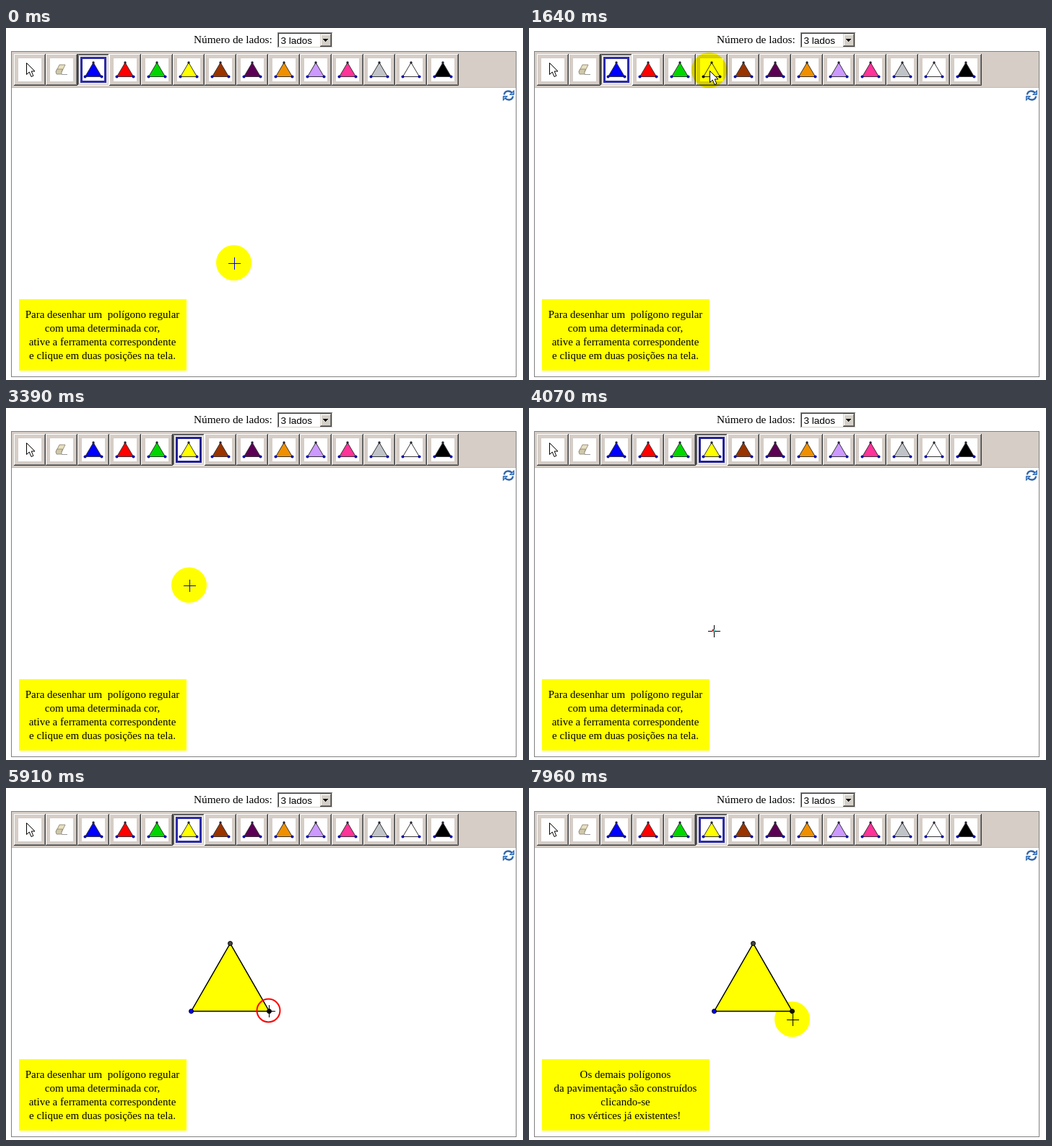
Recreate the animation shown at these times as an HTML page. Size 716x488 px, loop 8 s.

```html
<!DOCTYPE html>
<html lang="pt">
<head>
<meta charset="utf-8">
<style>
  html, body { margin: 0; width: 100%; height: 100%; overflow: hidden; background: #fff; }
  svg { display: block; isolation: isolate; }
  text { font-family: "Liberation Serif", serif; font-size: 15px; }
  #halo { mix-blend-mode: multiply; }
</style>
</head>
<body>
<svg width="716" height="488" viewBox="0 0 716 488">
  <rect width="716" height="488" fill="#fff"/>
  <text x="260" y="21" style="font-size:15.3px">Número de lados:</text>

  <g shape-rendering="crispEdges" fill="none">
    <path d="M376.5 27V6.5H452" stroke="#808080"/>
    <path d="M377.5 26V7.5H451" stroke="#404040"/>
    <path d="M377 26.5H451.5V7" stroke="#d4d0c8"/>
    <rect x="435" y="8" width="16" height="18" fill="#d4d0c8"/>
    <path d="M436.5 24V9.5H449" stroke="#fff"/>
    <path d="M435 25.5H450.5V8" stroke="#404040"/>
    <path d="M436 24.5H449.5V9" stroke="#808080"/>
    <path d="M439 15h7l-3.5 4z" fill="#000"/>
  </g>
  <text x="380.5" y="22" style="font:13.5px 'Liberation Sans',sans-serif">3 lados</text>

  <rect x="8" y="33" width="698" height="50" fill="#d5cdc6"/>
  <path d="M8 82.5H706" stroke="#c3bcb5"/>
  <rect x="7.5" y="32.5" width="699" height="451" fill="none" stroke="#808080"/>
  <g id="buttons"></g>

  <g fill="none" stroke="#2f66ad" stroke-width="2.4">
    <path d="M690 92.5C690.5 87 697 86 700.5 89.5M702 94.5C701.5 100 695 101 691.5 97.5"/>
    <path d="M703.5 86.5v6h-6zM688.5 100.5v-6h6z" fill="#6fa3dc" stroke-width="1"/>
  </g>

  <rect x="18" y="376" width="232" height="99" fill="#ff0"/>
  <g id="note" text-anchor="middle"></g>

  <g id="firstPoint">
    <circle cx="256.5" cy="309.5" r="5" fill="#a9b4d8"/>
    <circle cx="256.5" cy="309.5" r="3.5" fill="#00c" stroke="#003"/>
  </g>
  <g id="triangle" stroke="#000">
    <path d="M256.5 309.5H364.5L310.5 215.5z" fill="#ff0" stroke-width="1.5"/>
    <circle cx="256.5" cy="309.5" r="3" fill="#00f"/>
    <circle cx="364.5" cy="309.5" r="3" fill="#111"/>
    <circle cx="310.5" cy="215.5" r="3" fill="#444"/>
  </g>

  <circle id="halo" r="24.5" fill="#ff0"/>
  <circle id="ring" stroke="#f00" stroke-width="2"/>
  <path id="cross" d="M-8 0H9V1H-8zM0-8H1V0H0zM0 1H1V9H0z" shape-rendering="crispEdges"/>
  <path id="arrow" fill="#fff" stroke="#000"/>
</svg>

<script>
const $ = id => document.getElementById(id);
const show = (id, on) => $(id).style.display = on ? '' : 'none';

const ARROW = 'M.5 .5V16.5L4.2 13L7 19.5L9.8 18.3L7.2 12H12z';
const COLORS = ['#00f', '#f00', '#00d600', '#ff0', '#930', '#5b0054', '#f09000',
  '#cc99ff', '#ff3399', '#c0c4c8', '#fff', '#000'];
const BLUE = 2, YELLOW = 5;
const NOTES = [
  ['Para desenhar um\u00a0 polígono regular', 'com uma determinada cor,',
   'ative a ferramenta correspondente', 'e clique em duas posições na tela.'],
  ['Os demais polígonos', 'da pavimentação são construídos',
   'clicando-se', 'nos vértices já existentes!']
];

// Cursor path: time, x, y
const PATH = [
  [0, 316, 326], [440, 316, 326], [1280, 266, 133], [1640, 250, 59], [2730, 250, 59],
  [3030, 250, 141], [3570, 256, 299], [3870, 256, 309], [4310, 256, 309],
  [4550, 297, 311], [4850, 349, 308], [5030, 356, 307], [5400, 364, 309],
  [6630, 364, 309], [6870, 366, 326], [7110, 368, 342], [7780, 368, 342],
  [7960, 365, 321], [8000, 365, 321]
];
const CLICKS = [1770, 4070, 5600];
const STEP = 60, PRESS = 120, CLICK_TIME = 490, LOOP = 8000;

function icon(i) {
  if (i === 0) return `<path transform="translate(17 12)" d="${ARROW}" fill="#fff" stroke="#000"/>`;
  if (i === 1) return `<path d="M14 25l5-10h8l-5 10z" fill="#e8e0c0" stroke="#99907a"/>
    <path d="M14 25l1.5-4h8l-1.5 4v3h-7z" fill="#d0c8aa" stroke="#888070" stroke-width=".8"/>
    <path d="M22 28.5h8" stroke="#999"/>`;
  return `<path d="M22 12L10.5 31.5H33.5z" fill="${COLORS[i - 2]}" stroke="#333"/>
    <g fill="#0000a8"><circle cx="10.5" cy="31.5" r="2"/><circle cx="33.5" cy="31.5" r="2"/></g>
    <circle cx="22" cy="12" r="1.7" fill="#223"/>`;
}

function button(i, selected, focused) {
  const bevel = selected ? ['#404040', '#808080', '#fff', '#d5cdc6']
                         : ['#fff', '#d5cdc6', '#404040', '#808080'];
  const edges = ['M.5 43V.5H43', 'M1.5 42V1.5H42', 'M0 43.5H43.5V0', 'M1 42.5H42.5V1'];
  const frame = (color, extra) =>
    `<rect x="5.5" y="5.5" width="33" height="33" fill="none" stroke="${color}" ${extra}/>`;
  return `<g transform="translate(${11 + 44 * i} 36)">
    <rect width="44" height="44" fill="${selected ? '#e9e5e1' : '#d5cdc6'}"/>
    ${edges.map((d, k) => `<path d="${d}" fill="none" stroke="${bevel[k]}"/>`).join('')}
    <rect x="6" y="6" width="32" height="32" fill="#fff"/>${icon(i)}
    ${selected ? frame('#2c2ca8', 'stroke-width="3"') : ''}
    ${focused ? frame('#000058', 'stroke-dasharray="1 1"') : ''}</g>`;
}

function drawButtons(selected, focused) {
  $('buttons').innerHTML = Array.from({ length: COLORS.length + 2 },
    (_, i) => button(i, i === selected, focused && i === selected)).join('');
}

function drawNote(n) {
  $('note').innerHTML = NOTES[n].map((line, k) =>
    `<text x="133.5" y="${402 + 19 * k}">${line}</text>`).join('');
}

function cursorAt(t) {
  const i = PATH.findIndex(p => p[0] > t);
  const [t0, x0, y0] = PATH[i - 1], [t1, x1, y1] = PATH[i];
  const p = Math.floor((t - t0) / STEP) * STEP / (t1 - t0);
  return [Math.round(x0 + (x1 - x0) * p), Math.round(y0 + (y1 - y0) * p)];
}

let lastState = '';
function render(t) {
  const [x, y] = cursorAt(t);
  const [picked, placed, closed] = CLICKS.map(c => t >= c + PRESS);
  const selected = picked ? YELLOW : BLUE, focused = picked && !placed;
  const note = t >= 7310 ? 1 : 0;
  const state = [selected, focused, note].join();
  if (state !== lastState) {
    drawButtons(selected, focused);
    drawNote(note);
    lastState = state;
  }
  show('firstPoint', placed && !closed);
  show('triangle', closed);

  const click = CLICKS.find(c => t >= c && t < c + CLICK_TIME);
  show('halo', !click);
  show('ring', click);
  for (const id of ['halo', 'ring']) {
    $(id).setAttribute('cx', x - .5);
    $(id).setAttribute('cy', y - .5);
  }
  if (click) {
    const n = Math.floor((t - click) / STEP);
    $('ring').setAttribute('r', 1 + 3 * n);
    $('ring').setAttribute('fill', n ? 'none' : '#f00');
  }

  const onToolbar = y < 83;
  show('arrow', onToolbar);
  show('cross', !onToolbar);
  for (const id of ['arrow', 'cross']) $(id).setAttribute('transform', `translate(${x} ${y})`);
  // The cross inverts what lies below, except close to a vertex
  const nearVertex = closed && Math.hypot(x - 364, y - 309) < 13;
  $('cross').style.mixBlendMode = nearVertex ? 'normal' : 'difference';
  $('cross').setAttribute('fill', nearVertex ? '#000' : '#fff');
}

$('arrow').setAttribute('d', ARROW);
const start = performance.now();
(function tick() {
  render((performance.now() - start) % LOOP);
  requestAnimationFrame(tick);
})();
</script>
</body>
</html>
```
